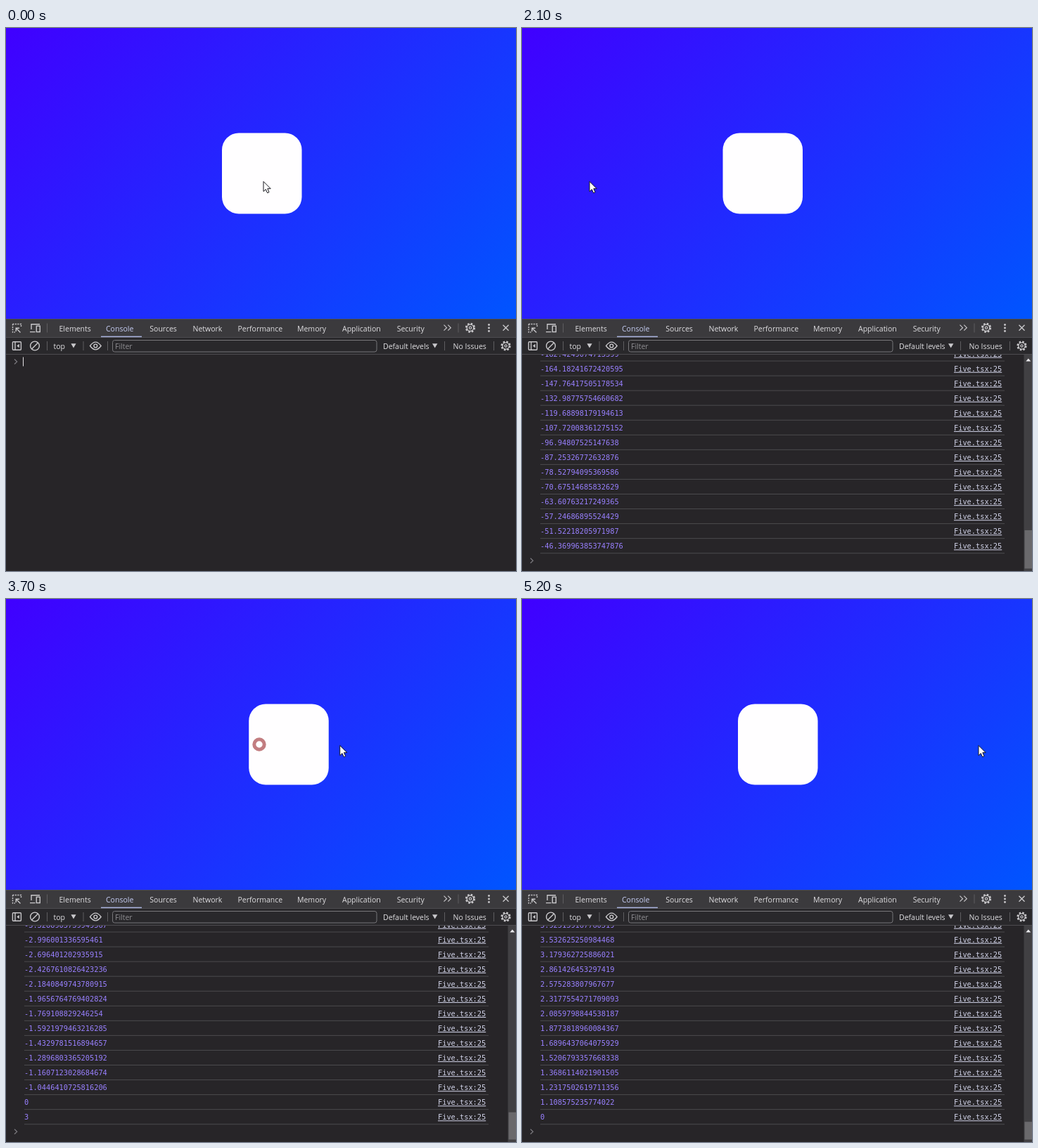
An HTML page for the animation above (5.9 s loop, 725 px wide and 773 px high).

```html
<!DOCTYPE html>
<html lang="en">
<head>
<meta charset="utf-8">
<title>Drag and spring back</title>
<style>
html, body { margin: 0; width: 100%; height: 100%; overflow: hidden; background: #272528; }
.page { position: absolute; left: 0; top: 0; width: 725px; height: 414px; background: linear-gradient(135deg, #4000ff, #0055ff); }
svg { position: absolute; left: 0; top: 0; display: block; }
.ui { font: 10.5px "Open Sans", "Noto Sans", sans-serif; fill: #e0dfe2; }
.ui .active { fill: #c6cdf2; }
.ui .hint { fill: #8f8e92; }
.log { font: 10.3px "DejaVu Sans Mono", "Noto Sans Mono", monospace; fill: #9980ff; }
.log .link { fill: #cfd1e6; text-decoration: underline; }
.log line { stroke: #4b4a4d; }
.sep { stroke: #5e5d60; }
.icon { fill: none; stroke: #c9c8cb; stroke-width: 1.4; }
.solid { fill: #c9c8cb; stroke: none; }
</style>
</head>
<body>
<div class="page"></div>
<svg width="725" height="773" viewBox="0 0 725 773">
  <defs>
    <g id="gear" class="icon">
      <circle r="5.9" stroke-width="2.4" stroke-dasharray="2.5 2.134" />
      <circle r="4.7" stroke-width="1.3" />
      <circle r="1.7" stroke-width="1.2" />
    </g>
  </defs>

  <rect id="box" x="307" y="149.5" width="113.5" height="115" rx="24" fill="#fffeff" />
  <circle id="ring" cx="360" cy="207" r="7.2" fill="none" stroke="#c27d80" stroke-width="5" />

  <rect y="464" width="725" height="309" fill="#272528" />
  <g id="log" class="log"></g>
  <path id="prompt" class="icon" d="M12 -3.5L15.7 0 12 3.5" style="stroke:#7b7a7f;stroke-width:1.2" />
  <path id="caret" d="M24.5 468.5V481.5" stroke="#e4e3e6" />
  <g id="scroll">
    <rect x="713.5" y="465" width="11.5" height="308" fill="#414043" />
    <path d="M716.3 474.5L719.8 470.5 723.3 474.5Z" fill="#efeef1" />
    <rect id="thumb" x="714.5" width="10.5" fill="#6a696c" />
  </g>

  <rect y="414" width="725" height="27" fill="#3b3a3d" />
  <rect y="440.5" width="725" height="24" fill="#29282b" />
  <path d="M0 414.5H725M0 440.5H725M0 464.5H725" stroke="#4d4c50" />
  <rect x="135" y="438.6" width="58" height="1.5" fill="#a9b2dc" />

  <g class="ui">
    <text x="75.5" y="431.6">Elements</text>
    <text x="142" y="431.6" class="active">Console</text>
    <text x="204.3" y="431.6">Sources</text>
    <text x="265.5" y="431.6">Network</text>
    <text x="329.5" y="431.6">Performance</text>
    <text x="414" y="431.6">Memory</text>
    <text x="478" y="431.6">Application</text>
    <text x="555.7" y="431.6">Security</text>
    <text x="67.5" y="456.6">top</text>
    <text x="155" y="457.2" class="hint">Filter</text>
    <text x="536" y="456.6">Default levels</text>
    <text x="635.5" y="456.6">No Issues</text>
  </g>
  <path class="sep" d="M58.5 420.5v13M643 420.5v13M58.5 446v13M110 446v13M144.5 446v13M623.5 446v13M693.5 446v13" />

  <g class="icon">
    <path d="M9.5 421.5H21.5V425M9.5 421.5V433H13" stroke-dasharray="2 1.4" />
    <path d="M20.5 433.5L14.5 427.5M14.2 432V427.2H19" />
    <path d="M36 429V421.7H48M34 432.6H41.5" />
    <rect x="43.3" y="424.2" width="5" height="8.4" />
    <path d="M622.5 422.7L626.5 426.7 622.5 430.7M628.3 422.7L632.3 426.7 628.3 430.7" stroke-width="1.2" />
    <path d="M706.5 422.7L714.5 430.7M714.5 422.7L706.5 430.7" />
    <rect x="9.4" y="446.7" width="12" height="11.6" rx="1" />
    <path d="M13 446.7V458.3" />
    <path class="solid" d="M15.3 452.5L18.8 449.7V455.3Z" />
    <circle cx="41" cy="452.5" r="6.4" />
    <path d="M36.5 457L45.5 448" />
    <path d="M119.5 452.5Q127.3 441.7 135.1 452.5Q127.3 463.3 119.5 452.5Z" />
    <circle cx="127.3" cy="452.5" r="2.4" />
    <path class="solid" d="M92.4 449.3H99.6L96 455.5ZM606 449.3H613.4L609.7 455.5Z" />
    <g class="solid">
      <circle cx="686.5" cy="422.5" r="1.4" /><circle cx="686.5" cy="427" r="1.4" /><circle cx="686.5" cy="431.5" r="1.4" />
    </g>
    <rect x="151.5" y="444.5" width="375.5" height="16.5" rx="3" stroke="#77767a" stroke-width="1" />
  </g>
  <use href="#gear" x="660" y="426.8" />
  <use href="#gear" x="710.5" y="452.5" />

  <path id="cursor" d="M0 0V14.2L3.3 11.2 5.6 16.3 8 15.2 5.8 10.2H10.2Z" fill="#fff" stroke="#16161c" stroke-linejoin="round" />
</svg>
<script>
const LOOP = 5900, TICK = 100, LAST = 5200;
const PITCH = 21.05, ROWS = 14;
const DECAY = 0.9, STEP = 19.2, LOG_LAG = 30;

// Each drag: times in ms, distance in px, logged peak and the last logged value before rest
const drags = [
  { press: 450, move: 460, stop: 1570, release: 1639, distance: -270, lead: 20,
    peak: -476, ease: 1.1, moves: 71, settles: 58, last: -1.0446410725816206 },
  { press: 3560, move: 3675, stop: 3864, release: 3864, distance: 289, lead: 50,
    peak: 482, ease: 1.87, moves: 15, settles: 56, last: 1.108575235774022 }
];

const $ = id => document.getElementById(id);
const clamp = v => Math.min(1, Math.max(0, v));
const series = (n, f) => Array.from({ length: n }, (_, i) => f(i + 1));
const show = (id, on) => { $(id).style.display = on ? "" : "none"; };
const place = (el, x, y) => el.setAttribute("transform", `translate(${x} ${y})`);

function add(parent, tag, attrs, text = "") {
  const el = document.createElementNS("http://www.w3.org/2000/svg", tag);
  for (const k in attrs) el.setAttribute(k, attrs[k]);
  el.textContent = text;
  return parent.appendChild(el);
}

const logs = drags.flatMap(d => [
  ...series(d.moves, i => 1.5 * Math.round(d.peak * (i / d.moves) ** d.ease / 1.5)),
  ...series(d.settles, i => d.last / DECAY ** (d.settles - i)),
  0
]);

const pulled = (d, t) => clamp((t - d.move) / (d.stop - d.move));

function boxOffset(d, t) {
  const x = d.distance * pulled(d, t) * DECAY ** (Math.max(0, t - d.release) / STEP);
  return t > d.release && Math.abs(x) < 0.6 ? 0 : x;
}

// One line on press, more while moving, then one per settling step
function logCount(d, t) {
  if (t < d.press) return 0;
  const late = t - LOG_LAG;
  const moves = 1 + Math.floor((d.moves - 1) * pulled(d, late));
  const settles = Math.floor(Math.max(0, late - d.release) / STEP);
  return moves + Math.min(d.settles + 1, settles);
}

function cursorAt(t) {
  const pull = d => d.distance * pulled(d, t + d.lead);
  const back = clamp((t - 2700) / 800);
  return [366 + pull(drags[0]) + 264 * back + pull(drags[1]), 218.5 - 10 * back];
}

const rows = series(ROWS, () => {
  const g = add($("log"), "g", {});
  add(g, "line", { x1: 26, x2: 686, y1: 10, y2: 10 });
  add(g, "text", { x: 614, y: 3.6, class: "link" }, "Five.tsx:25");
  return { g, value: add(g, "text", { x: 26, y: 3.6 }) };
});

function drawLog(n) {
  const end = Math.min(475 + PITCH * n, 758.3);
  place($("prompt"), 0, end);
  rows.forEach(({ g, value }, k) => {
    g.style.display = k < n ? "" : "none";
    value.textContent = logs[n - 1 - k];
    place(g, 0, end - 20.6 - PITCH * k);
  });
  const height = 1 / (0.0002 + 0.000195 * n);
  show("scroll", n >= ROWS);
  $("thumb").setAttribute("height", height);
  $("thumb").setAttribute("y", 769.5 - height);
}

function draw(t) {
  const sum = f => drags.reduce((total, d) => total + f(d, t), 0);
  place($("box"), sum(boxOffset), 0);
  place($("cursor"), ...cursorAt(t));
  show("ring", t >= 3600 && t < 3800);
  show("caret", t < 400);
  drawLog(sum(logCount));
}

let start, shown = 0;
function frame(now) {
  start ??= now;
  const t = Math.min(LAST, Math.floor((now - start) % LOOP / TICK) * TICK);
  if (t !== shown) draw(shown = t);
  requestAnimationFrame(frame);
}
draw(0);
requestAnimationFrame(frame);
</script>
</body>
</html>
```
